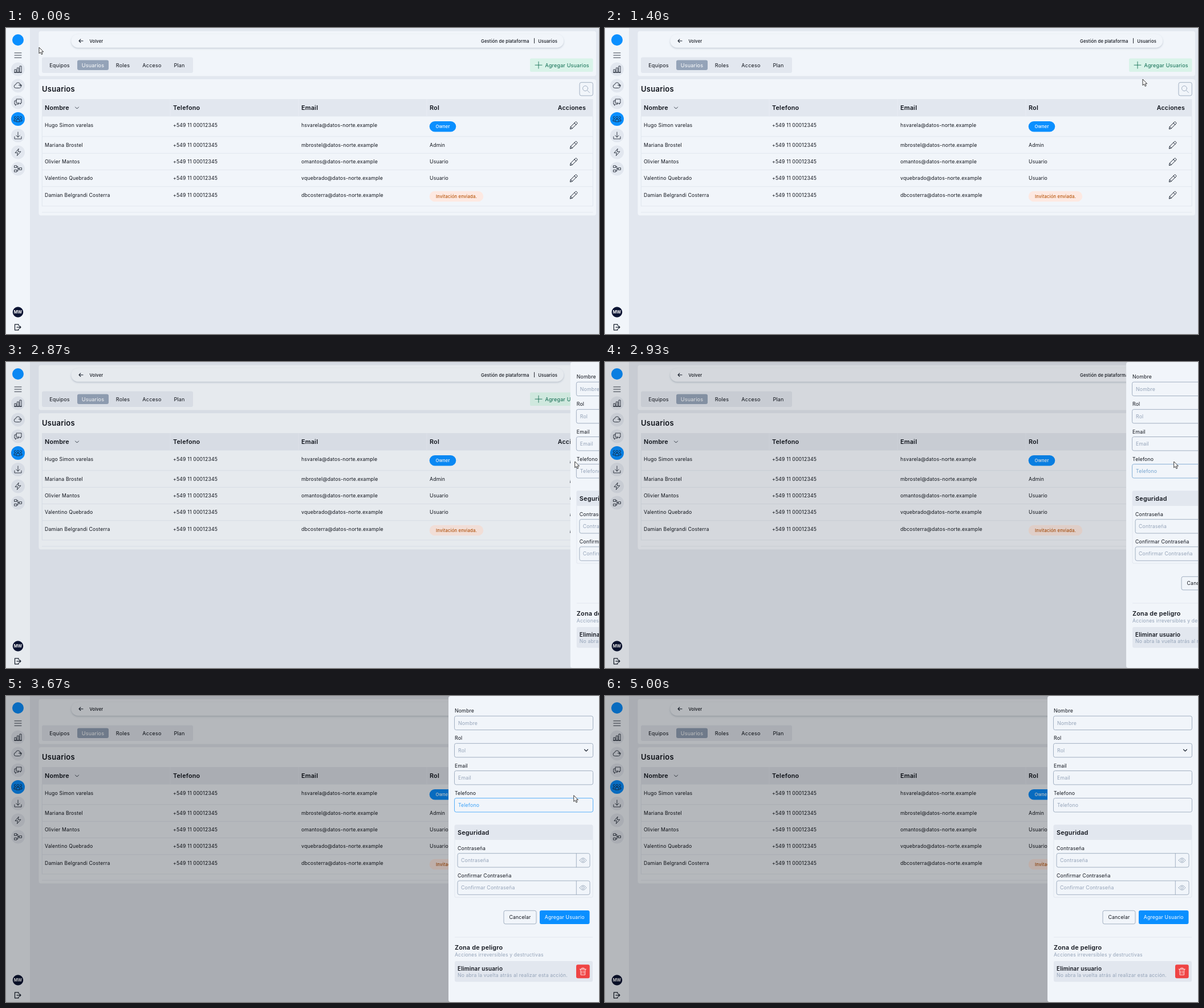
These frames come from a looping animation (1040 px wide and 538 px high, 5.74 s). An HTML page:

```html
<!DOCTYPE html>
<html lang="es">
<head>
<meta charset="utf-8">
<style>
html, body { margin: 0; width: 100%; height: 100%; overflow: hidden; background: #e2e7ef; }
svg { display: block; }
text { font-family: Inter, sans-serif; letter-spacing: .02em; }
.line { fill: none; stroke: #18202e; stroke-width: .85; stroke-linecap: round; stroke-linejoin: round; }
</style>
</head>
<body>
<svg id="stage" width="1040" height="538" viewBox="0 0 1040 538"></svg>
<script>
const INK = '#10141c', BASE = '#e2e7ef', CARD = '#f1f5fa', BLUE = '#0a8fff', MUTED = '#94a3b8', GREEN = '#0c6b50';

const rect = (x, y, w, h, fill, r = 0, extra = '') =>
  `<rect x="${x}" y="${y}" width="${w}" height="${h}" fill="${fill}" rx="${r}" ${extra}/>`;
const text = (x, y, s, size = 8.7, fill = INK, weight = 400, anchor = 'start', extra = '') =>
  `<text x="${x}" y="${y}" font-size="${size}" fill="${fill}" font-weight="${weight}" text-anchor="${anchor}" ${extra}>${s}</text>`;
const middle = (x, y, s, size, fill, weight) => text(x, y, s, size, fill, weight, 'middle');
const icon = (x, y, d, style = '') =>
  `<path class="line" transform="translate(${x} ${y})" d="${d}" style="${style}"/>`;
const hline = (x1, x2, y) => `<path d="M${x1} ${y}H${x2}" stroke="${BASE}"/>`;
const box = (x, y, w, h = 24.4, extra = '') => rect(x, y, w, h, 'none', 3, `stroke="${MUTED}" stroke-width=".85" ${extra}`);

const chevron = 'M-3-1.5L0 1.5 3-1.5';
const pencil = 'M-6 6.3l.8-3.7L3.1-5.7q1-1 2 0l.9.9q1 1 0 2L-2.3 5.5zM1.4-4l2.9 2.9M-5.2 2.6l2.9 2.9';

function sidebar() {
  const icons = [
    [72.5, 'M-6 5.5v-5h3v5zM-1.5 5.5v-8h3v8zM3 5.5v-11h3v11zM-6.5 5.5h13'],
    [101.5, 'M2 4h-5.5a3 3 0 0 1-.5-6A4.2 4.2 0 0 1 4-3M6-1H1.5M6-1q.5 4-3 5M3-3l3 2-2.5 2'],
    [130.5, 'M-2.5-5.5H6v7H4.5v2l-2-2h-5zM-2.5-2.5H-6v6h1.5v2.2l2.2-2.2H1v-2'],
    [160, 'M0-.5a2 2 0 1 0-.1 0M-3.2 4.5V3.2a3.2 3.2 0 0 1 6.4 0v1.3zM-4.5-1.2a1.7 1.7 0 1 1 .7-3M4.5-1.2a1.7 1.7 0 1 0-.7-3M-4.5 3.5H-7V2.2q.3-2.5 3-2.5M4.5 3.5H7V2.2q-.3-2.5-3-2.5'],
    [189, 'M0-6V3M-3.2-.2L0 3l3.2-3.2M-6 2v4H6V2'],
    [218.5, 'M1-6L-5 1h4.5L-1.5 6 5-1.2H.4z'],
    [247.5, 'M-6-5.5h4v3.5h-4zM-6 2h4v3.5h-4zM2.5-1.7h4v3.5h-4zM-2-3.7H0v7.5h-2M0 0h2.5']
  ];
  return rect(0, 0, 42, 538, CARD) +
    `<circle cx="21" cy="21" r="10" fill="${BLUE}"/>` +
    icon(21, 48, 'M-6-4.2H6M-6 0H6M-6 4.2H6') +
    icons.map(([y, d]) => `<circle cx="21" cy="${y}" r="12" fill="${y === 160 ? BLUE : BASE}"/>` + icon(21, y, d)).join('') +
    `<circle cx="21" cy="499.5" r="9.3" fill="#0b1433"/>` + middle(21, 502.2, 'MW', 7.3, '#fff', 700) +
    icon(20.5, 526, 'M1.5-3V-5H-5V5h6.5V3M-1.5 0h7M3.2-2.3L5.5 0 3.2 2.3', 'stroke-width:1.25');
}

function header() {
  const tabs = [[94, 'Equipos'], [152.5, 'Usuarios'], [205, 'Roles'], [256, 'Acceso'], [304, 'Plan']];
  return rect(57.5, 5.5, 977.5, 79, CARD, 4) +
    rect(114.5, 11, 863.5, 23.5, CARD, 11.7, 'filter="url(#soft)"') +
    icon(131.5, 22.7, 'M3.5 0h-7M-.7-2.8L-3.5 0l2.8 2.8', 'stroke-width:1.1') +
    text(146.5, 25.5, 'Volver', 7.5, INK, 500) +
    text(833, 25.5, 'Gestión de plataforma', 7.7, INK, 500) + middle(926.7, 25.3, '|', 7.7, INK, 600) +
    text(967, 25.5, 'Usuarios', 7.7, INK, 500, 'end') +
    rect(63, 51.5, 265, 27.5, BASE, 3) + rect(125, 56.5, 55, 17.5, MUTED, 3) +
    tabs.map(([x, s], i) => middle(x, 68.5, s, 9.1, i === 1 ? '#fff' : INK)).join('') +
    rect(919, 53.5, 110.5, 23.5, '#d9f3e9', 2) +
    icon(934, 65.2, 'M-6 0H6M0-6V6', 'stroke:' + GREEN) +
    text(945.5, 68.5, 'Agregar Usuarios', 9, GREEN);
}

function table() {
  const users = [
    ['Hugo Simon varelas', 'hsvarela', 171],
    ['Mariana Brostel', 'mbrostel', 205.5, 'Admin'],
    ['Olivier Mantos', 'omantos', 235, 'Usuario'],
    ['Valentino Quebrado', 'vquebrado', 264, 'Usuario'],
    ['Damian Belgrandi Costerra', 'dbcosterra', 293.5]
  ];
  const columns = [[68, 'Nombre'], [293, 'Telefono'], [518, 'Email'], [743, 'Rol']];
  return rect(57.5, 90, 977.5, 239.5, CARD, 4) +
    text(63, 112, 'Usuarios', 13, INK, 600) +
    box(1006, 95.7, 23.3, 23.3) +
    icon(1017.5, 107.2, 'M3-1a4.5 4.5 0 1 1-9 0a4.5 4.5 0 1 1 9 0M2 2.5l4 4', 'stroke:' + MUTED) +
    rect(63, 125, 966.5, 30.5, BASE) +
    columns.map(([x, s]) => text(x, 144.2, s, 10.8, INK, 600) +
      (x > 68 ? `<path d="M${x - 5} 125v30.5" stroke="#e8ecf3"/>` : '')).join('') +
    text(1017, 144.2, 'Acciones', 10.6, INK, 600, 'end') +
    icon(124.5, 140.5, chevron) +
    [190.8, 220.3, 249.5, 278.8, 313, 324].map(y => hline(63, 1029.5, y)).join('') +
    `<path d="M63.3 155V313M1029.3 155V313" stroke="${BASE}"/>` +
    users.map(([name, mail, y, role]) => text(68, y + 3.1, name) + text(293, y + 3.1, '+549 11 00012345') +
      text(518, y + 3.1, mail + '@datos-norte.example') + (role ? text(743, y + 3.1, role) : '') +
      icon(995.5, y, pencil, 'stroke-width:1')).join('') +
    rect(742.7, 164, 46.5, 18.5, BLUE, 9.2) + middle(766, 176.2, 'Owner', 7.7, '#fff', 500) +
    rect(742.7, 286.7, 94.5, 18.5, '#fde9e2', 9.2) + middle(790, 298.8, 'Invitación enviada.', 7.7, '#b8560d', 500);
}

function drawer() {
  const hint = (x, y, s, extra) => text(x, y + 15.3, s, 8.7, MUTED, 400, 'start', extra);
  const field = (s, y, id) => text(11, y - 6, s) +
    box(10.5, y, 243, 24.4, `id="box${id}"`) + hint(17, y, s, `id="hint${id}"`);
  const secret = (s, y) => text(16, y - 6.2, s) + box(16, y, 232) + hint(22, y, s) +
    `<path d="M224.3 ${y}v24.4" stroke="${MUTED}" stroke-width=".85"/>` +
    icon(236, y + 12.2, 'M-6 0Q0-8.5 6 0Q0 8.5-6 0M2.2 0a2.2 2.2 0 1 1-4.4 0a2.2 2.2 0 1 1 4.4 0', 'stroke:' + MUTED);
  return rect(0, 0, 280, 538, CARD, 4) +
    ['Nombre', 'Rol', 'Email', 'Telefono'].map((s, i) => field(s, 35.2 + i * 48.15, s)).join('') +
    icon(241.5, 95.5, chevron, 'stroke-width:1.1') +
    rect(11, 227, 242, 127, 'none', 2, `stroke="${BASE}"`) + rect(11, 226.5, 242, 26.5, BASE, 2) +
    text(16, 243.5, 'Seguridad', 10.8, INK, 600) +
    secret('Contraseña', 276.7) + secret('Confirmar Contraseña', 324.9) +
    box(97, 377.3, 57, 23.5) + middle(125.5, 392.2, 'Cancelar') +
    rect(160, 377, 87.5, 24, BLUE, 3) + middle(203.7, 392.2, 'Agregar Usuario', 8.7, '#fff') +
    hline(11, 253, 424) +
    text(11, 446, 'Zona de peligro', 10.8, INK, 600) +
    text(11, 457.5, 'Acciones irreversibles y destructivas', 8.6, MUTED) +
    rect(11, 466, 242, 36.5, BASE, 3) + text(16, 482.5, 'Eliminar usuario', 9.8, INK, 600) +
    text(16, 494.3, 'No abra la vuelta atrás al realizar esta acción.', 8.6, MUTED) +
    rect(224, 472.3, 23.7, 24, '#ef4444', 3) +
    icon(235.8, 484.3, 'M-5.5-4H5.5M-2-4v-2h4v2M-4.3-4l.6 10h7.4l.6-10M-1.7-1.5v5M1.7-1.5v5', 'stroke:#fff');
}

const stage = document.getElementById('stage');
stage.innerHTML = `<defs><filter id="soft" x="-5%" y="-50%" width="110%" height="220%">
  <feDropShadow dx="0" dy="1.5" stdDeviation="1.5" flood-color="#64748b" flood-opacity=".35"/></filter></defs>` +
  rect(0, 0, 1040, 538, BASE) + sidebar() + header() + table() +
  rect(0, 0, 1040, 538, '#000', 0, 'id="shade"') +
  `<g id="drawer">${drawer()}</g>
  <path id="cursor" d="M0 0v10.8l2.5-2.2 1.8 3.9 1.8-.8-1.7-3.8h3.3z" fill="#fff" stroke="#222" stroke-width=".9" stroke-linejoin="round"/>`;
const [shade, panel, cursor, phoneBox, phoneHint] =
  ['shade', 'drawer', 'cursor', 'boxTelefono', 'hintTelefono'].map(id => document.getElementById(id));

// Times below are in ticks of 1/15 s.
// Each move: start, end, x, y, bow of the path.
const moves = [
  [3, 12, 349, 38, 11], [12, 21, 943, 90, 0], [21, 28, 998, 181, 0], [30, 33, 995, 177, 0],
  [36, 41, 997.7, 175, 0], [51, 52, 996, 175, 0], [54, 57, 995, 174, 0],
  [59, 67.8, 207, 447, 23], [68, 75, 0, 533, 0]
];
const slide = [[42, 0], [43, .19], [44, .477], [45, .745], [46, .924], [47, .97], [49, .993], [51, 1]];
const hover = [[43, 0], [44, .35], [46, 1], [65, 1], [66, .75], [69, 0]];

function along(keys, k) {
  const i = keys.findIndex(key => key[0] > k);
  if (i < 0) return keys[keys.length - 1][1];
  if (i === 0) return keys[0][1];
  const [a, from] = keys[i - 1], [b, to] = keys[i];
  return from + (to - from) * (k - a) / (b - a);
}

function pointer(k) {
  let x = 58, y = 34;
  for (const [a, b, toX, toY, bow] of moves) {
    const u = Math.min(1, Math.max(0, (k - a) / (b - a))), e = u * u * (3 - 2 * u);
    x += (toX - x) * e;
    y += (toY - y) * e + bow * 4 * e * (1 - e);
  }
  return [x, y];
}

function draw(now) {
  const k = Math.floor((now % 5740 + 5) * 15 / 1000);
  const open = along(slide, k), glow = along(hover, k);
  shade.style.opacity = .25 * open;
  panel.setAttribute('transform', `translate(${1040 - 264 * open} 0)`);
  panel.style.display = open ? '' : 'none';
  phoneBox.style.stroke = phoneHint.style.fill = `color-mix(in srgb, #3ba2f8 ${glow * 100}%, ${MUTED})`;
  cursor.setAttribute('transform', `translate(${pointer(k)})`);
  cursor.style.display = k < 75 ? '' : 'none';
  requestAnimationFrame(draw);
}
requestAnimationFrame(draw);
</script>
</body>
</html>
```
